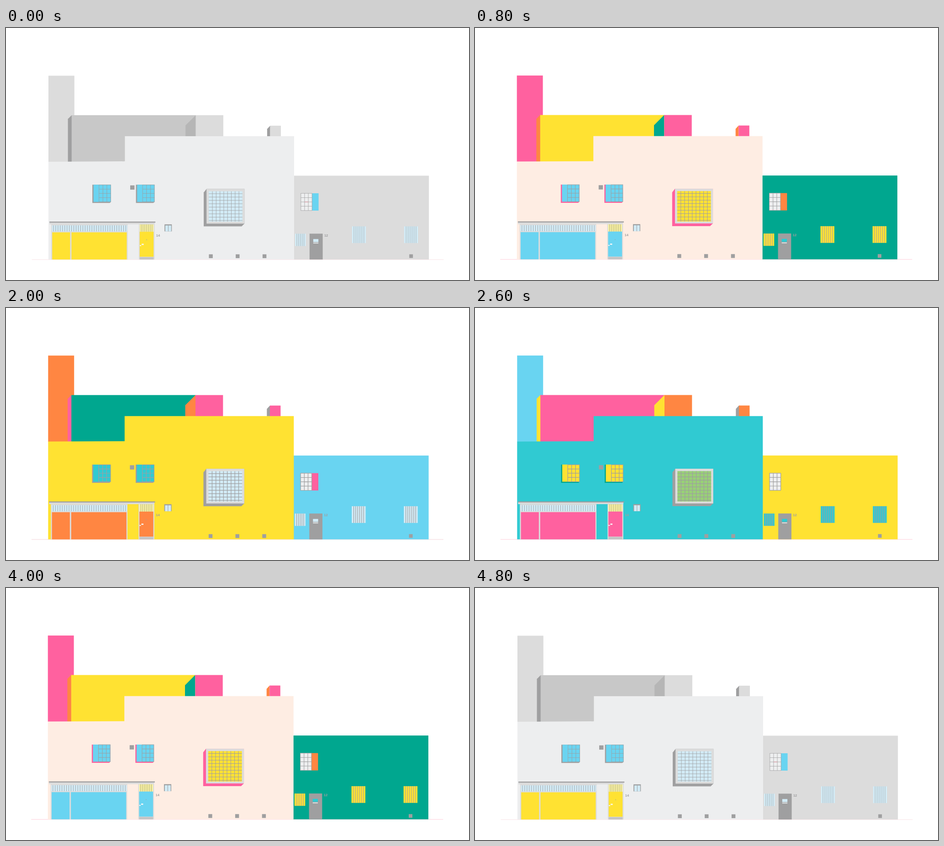
Write an HTML page that moves like this. It is 1014 by 552 pixels and loops after 5.8 s.

```html
<!DOCTYPE html>
<html lang="en">
<head>
<meta charset="utf-8">
<title>Facade in changing colours</title>
<style>
  html, body { margin: 0; width: 100%; height: 100%; overflow: hidden; background: #fff; }
  svg { display: block; width: 100%; height: 100%; }
  path { fill: none; }
  text { font: bold 7.6px "Liberation Sans", Arial, sans-serif; }
</style>
</head>
<body>
<svg id="stage" viewBox="0 0 1014 552"><g id="house"></g></svg>
<script>
const pink = '#ff619f', yellow = '#ffe232', orange = '#ff8642', blue = '#69d4f1';
const teal = '#30cad2', green = '#00a78f', pale = '#d2ebf6';
const gray = '#9f9fa0', light = '#dcdcdc';

const base = {
  wall: '#edeeef', annex: light, tower: light, back: '#c8c8c8', block: light,
  side: gray, slope: '#b6b6b6', chimneySide: gray,
  pane: blue, paneShade: gray, bay: pale, bayShade: gray,
  garage: yellow, shutter: blue, bars: pale, hatch: pale,
  ground: '#f9e3e6', line: 0.8, mark: '#f08a98', dx: 0.6, dy: 0.3
};
const schemes = {
  neutral: base,
  rose: { ...base, wall: pink, annex: orange, tower: blue, back: '#ffebdf', block: '#ffebdf',
    ground: '#d9d9d9', line: 1.2, mark: gray, dx: 0, dy: 0.3 },
  sunny: { ...base, wall: yellow, annex: blue, tower: orange, back: green, block: pink,
    side: pink, slope: orange, pane: teal, garage: orange, shutter: pink,
    ground: '#f3d3d8', line: 1.2, mark: gray, dx: 0, dy: 0 },
  lagoon: { ...base, wall: teal, annex: yellow, tower: blue, back: pink, block: orange,
    side: yellow, slope: yellow, pane: yellow, paneShade: green, bay: '#98d077',
    garage: pink, shutter: yellow, bars: teal, hatch: teal,
    ground: '#ffcdd7', line: 1.2, mark: gray, dx: 0, dy: -0.1 },
  cream: { ...base, wall: '#feede3', annex: green, tower: pink, back: yellow, block: pink,
    side: orange, slope: green, chimneySide: orange, paneShade: pink, bay: yellow, bayShade: pink,
    garage: blue, shutter: orange, bars: yellow, hatch: teal,
    ground: '#ffcdd7', line: 1, mark: gray, dx: -0.6, dy: -0.1 }
};
// Walks through the palettes and back again.
const order = ['neutral', 'rose', 'sunny', 'lagoon', 'cream', 'lagoon', 'sunny', 'rose'];

const paint = c => c[0] === '#' ? c : `var(--${c})`;
const rect = (c, x1, y1, x2, y2) =>
  `<rect x="${x1}" y="${y1}" width="${x2 - x1}" height="${y2 - y1}" style="fill:${paint(c)}"/>`;
const poly = (c, points) => `<polygon points="${points}" style="fill:${paint(c)}"/>`;
const stroke = (d, c = gray, width = 'var(--line)') =>
  `<path d="${d}" style="stroke:${paint(c)};stroke-width:${width}"/>`;
const spread = (count, start, step, draw) =>
  Array.from({ length: count }, (_, i) => draw(start + i * step)).join('');
const columns = (count, x, step, y1, y2) => spread(count, x, step, v => `M${v} ${y1}V${y2}`);
const rows = (count, y, step, x1, x2) => spread(count, y, step, v => `M${x1} ${v}H${x2}`);

const paneWindow = x =>
  poly('paneShade', `${x},343 ${x + 40.7},343 ${x + 40.7},380.6 ${x + 38},383 ${x},383`) +
  rect('pane', x + 2.6, 343, x + 40.7, 380.6) +
  stroke(columns(4, x + 14.6, 8.55, 343, 380.6) + rows(5, 343.4, 9.3, x + 14.6, x + 40.7));

const barWindow = (x, y, width, height, count) =>
  rect('bars', x, y, x + width, y + height) +
  stroke(columns(count, x + width / (count + 1), width / (count + 1), y, y + height));

const vent = (x, y = 495.4, size = 8.4) => rect(gray, x, y, x + size, y + size);
const number = (x, label) => `<text x="${x}" y="456.3" fill="${gray}">${label}</text>`;

const roofs =
  rect('tower', 92.3, 104.2, 149.2, 293) +
  rect('back', 143, 190.7, 415.2, 293) +
  poly('side', '135,199 143.2,190.7 143.2,293 135,293') +
  poly('slope', '392.6,213 415,190.7 415,238 392.6,238') +
  rect('block', 415, 190.7, 475.3, 238) +
  poly('chimneySide', '571.3,221 578,213.7 578,238 571.3,238') +
  rect('block', 578, 213.7, 601.4, 238);

const walls =
  rect('annex', 629.6, 323.2, 925.6, 506.8) +
  poly('wall', '92.3,292.6 259.8,291.8 259.8,236.8 630.3,236.8 630.3,506.8 92.3,506.8');

const bayWindow =
  poly('bayShade', '432.4,360 438.6,352.2 521.7,352.2 521.7,428.2 515.5,434.2 432.4,434.2') +
  rect(light, 438.6, 352.2, 521.7, 428.2) +
  rect('bay', 443.4, 357.4, 517.2, 423.8) +
  stroke(columns(8, 451.4, 8.3, 357.4, 423.8) + rows(9, 362.6, 7.35, 443.4, 517.2));

const garage =
  rect(light, 98.3, 429.5, 266, 506.8) +
  rect(pale, 100, 432, 265, 445.2) +
  stroke(columns(33, 103.4, 4.95, 432, 445.2), gray, 0.9) +
  rect('garage', 100.6, 447.3, 139.8, 506.8) +
  rect('garage', 142.8, 447.3, 263.8, 506.8);

const frontDoor =
  rect(light, 290.3, 429.5, 324.8, 506.8) +
  rect('#fbf3a2', 292.2, 430, 322.6, 446) +
  stroke(columns(7, 295.5, 3.95, 430, 446), '#a9a77d', 1) +
  rect('garage', 292.2, 446, 322.6, 500.8) +
  rect('#c4c4c4', 292.2, 501.6, 322.6, 506.8) +
  rect('#f8f8f8', 296.5, 472.3, 301, 475) +
  rect('#f8f8f8', 292.3, 475.3, 295.5, 477.3) +
  `<circle cx="307.4" cy="463.6" r="0.8" fill="${gray}"/>`;

const canopy =
  rect(light, 94.5, 426, 325, 429.7) +
  rect(gray, 94.5, 423.7, 326.6, 426.1);

const smallWindow =
  rect(gray, 346.6, 429.8, 362.6, 445.2) +
  rect(pale, 348.4, 432.2, 361.2, 445.2) +
  stroke('M354.8 432V445.2', gray, 1);

const annexWindow =
  rect('shutter', 669.5, 361.7, 684, 399.7) +
  rect('#eeeff0', 645, 361.7, 669.5, 399.7) +
  stroke(columns(4, 645.2, 8.15, 361.7, 399.7) + rows(5, 361.9, 9.4, 645, 669.6)) +
  stroke('M653.4 380.7H661.5', 'mark');

const annexDoor =
  rect(gray, 664.2, 450.2, 693, 506.8) +
  rect('hatch', 672.3, 462, 683.6, 468.6) +
  rect('#f4f8fa', 672.3, 470, 683.6, 471.5);

const house = document.getElementById('house');
house.innerHTML = [
  stroke('M55.8 507H958', 'ground', 1),
  roofs, walls,
  paneWindow(188.5), paneWindow(284), vent(271.4, 344.4, 9.4),
  bayWindow, garage, frontDoor, canopy, smallWindow, number(328.2, '14'),
  vent(443.8), vent(502.5), vent(561.3), vent(882.6, 495.4, 8),
  annexWindow, annexDoor, number(696.3, '12'),
  barWindow(632.5, 450.3, 23.4, 27, 5),
  barWindow(757.2, 434.2, 30.4, 36.6, 6), barWindow(871.3, 434.2, 30.4, 36.6, 6)
].join('');

const LOOP = 5800, STEP = 200, LAST_STEP = 24;
let current;

function show(name) {
  if (name === current) return;
  current = name;
  const { dx, dy, ...colours } = schemes[name];
  for (const [key, value] of Object.entries(colours)) house.style.setProperty('--' + key, value);
  house.setAttribute('transform', `translate(${dx} ${dy})`);
}

function frame() {
  const step = Math.min(LAST_STEP, Math.floor(performance.now() % LOOP / STEP));
  show(order[step % order.length]);
  requestAnimationFrame(frame);
}
frame();
</script>
</body>
</html>
```
